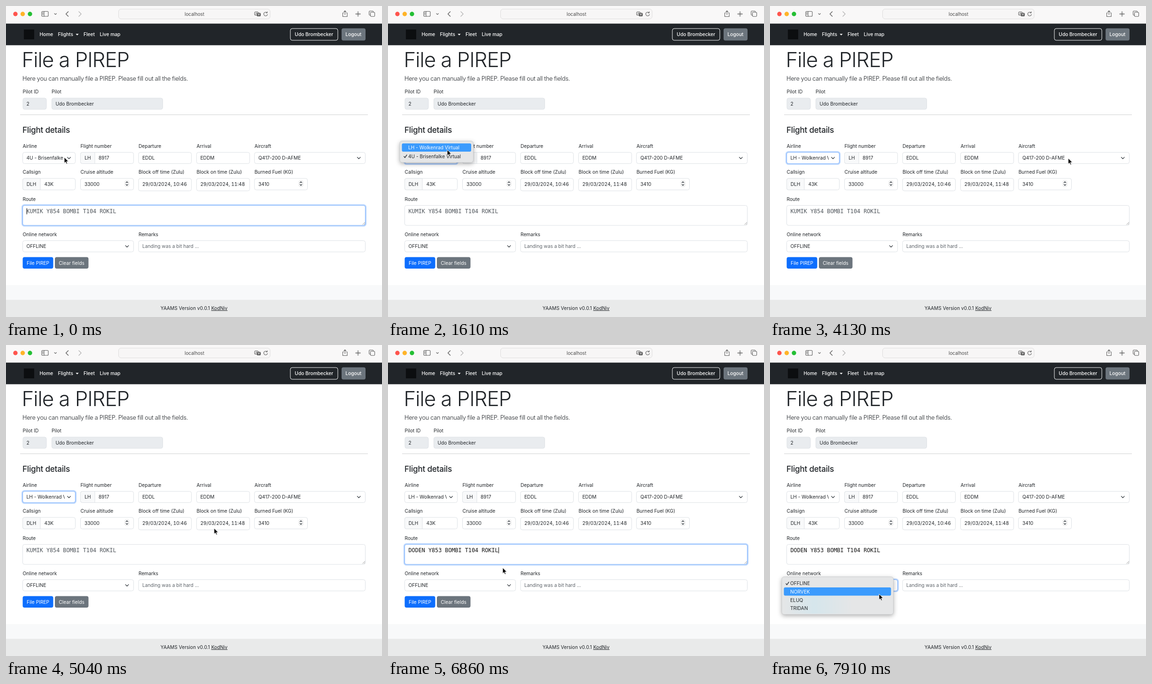
An HTML page that plays this animation: 800 px wide and 662 px high, repeating every 8 s.

```html
<!DOCTYPE html>
<html lang="en">
<head>
<meta charset="utf-8">
<title>File a PIREP</title>
<style>
  html, body { margin: 0; width: 100%; height: 100%; overflow: hidden; background: #fff; }
  svg { display: block; width: 800px; height: 662px; font: 10.2px Inter, "Liberation Sans", sans-serif; }
  text { fill: #212529; white-space: pre; }
  .mid { text-anchor: middle; }
  .white { fill: #fff; }
  .nav text { fill: #fff; font-weight: 500; }
  .title { font-size: 44px; font-weight: 300; letter-spacing: -.025em; }
  .lead { font-size: 12.8px; font-weight: 300; letter-spacing: -.023em; }
  .heading { font-size: 17.2px; font-weight: 500; letter-spacing: -.015em; }
  .address { font-size: 9.8px; fill: #4a4a4a; }
  .mono { font: 11.75px "DejaVu Sans Mono", monospace; }
  .hint { fill: #5f656b; }
  .mono.hint { fill: #50565c; }
  .date { font-variant-numeric: tabular-nums; }
  .box rect { fill: #fff; stroke: #dee2e6; rx: 4px; }
  .box .off { fill: #e9ecef; }
  .addon { fill: #f8f9fa; stroke: #dee2e6; }
  .line { fill: none; stroke: #343a40; stroke-width: 1.3; stroke-linecap: round; stroke-linejoin: round; }
  .icons { fill: none; stroke: #606060; stroke-width: 1.1; stroke-linecap: round; stroke-linejoin: round; }
  .ring { fill: none; stroke: #bfd9fe; stroke-width: 2.6; }
  .edge { fill: none; stroke: #86b7fe; stroke-width: 1.2; }
  .menu { filter: drop-shadow(0 3px 5px rgba(0, 0, 0, .3)); }
  .panel { fill: #e5e6e7; stroke: #c6c8ca; stroke-width: .8; }
  .pick { fill: #3b9bfd; }
  .caret { stroke: #111; stroke-width: 1.1; }

  .state { opacity: 0; animation: 8s step-end infinite; }
  .old-airline { animation-name: old-airline; }
  .new-airline { animation-name: new-airline; }
  .airline-focus { animation-name: airline-focus; }
  .airline-menu { animation-name: airline-menu; }
  .airline-first { animation-name: airline-first; }
  .airline-second { animation-name: airline-second; }
  .old-route { animation-name: old-route; }
  .new-route { animation-name: new-route; }
  .route-focus { animation-name: route-focus; }
  .caret-start { animation-name: caret-start; }
  .caret-end { animation-name: caret-end; }
  .network { animation-name: network; }
  .network-first { animation-name: network-first; }
  .network-second { animation-name: network-second; }
  .arrow { animation-name: arrow; }
  .beam { animation-name: beam; }

  @keyframes old-airline { 0% { opacity: 1 } 22.4% { opacity: 0 } }
  @keyframes new-airline { 22.4% { opacity: 1 } 100% { opacity: 1 } }
  @keyframes airline-focus { 7% { opacity: 1 } 75.6% { opacity: 0 } }
  @keyframes airline-menu { 7% { opacity: 1 } 22.4% { opacity: 0 } }
  @keyframes airline-second { 7% { opacity: 1 } 15.8% { opacity: 0 } }
  @keyframes airline-first { 15.8% { opacity: 1 } 22.4% { opacity: 0 } }
  @keyframes old-route { 0% { opacity: 1 } 79.4% { opacity: 0 } }
  @keyframes new-route { 79.4% { opacity: 1 } 100% { opacity: 1 } }
  @keyframes route-focus { 0%, 75.6% { opacity: 1 } 7%, 90.1% { opacity: 0 } }
  @keyframes caret-start { 0%, 75.6% { opacity: 1 } 7%, 79.4% { opacity: 0 } }
  @keyframes caret-end { 79.4% { opacity: 1 } 90.1% { opacity: 0 } }
  @keyframes network { 90.1% { opacity: 1 } 100% { opacity: 1 } }
  @keyframes network-first { 90.1% { opacity: 1 } 94.3% { opacity: 0 } }
  @keyframes network-second { 94.3% { opacity: 1 } 100% { opacity: 1 } }
  @keyframes arrow { 0%, 45.6%, 84.5% { opacity: 1 } 27.5%, 68.5% { opacity: 0 } 100% { opacity: 1 } }
  @keyframes beam { 27.5%, 68.5% { opacity: 1 } 45.6%, 84.5% { opacity: 0 } }

  .pointer { animation: pointer 8s ease-in-out infinite; }
  @keyframes pointer {
    0%, 12.5% { transform: translate(124px, 322px) }
    18.7%, 22% { transform: translate(126px, 306px) }
    29.2%, 38.2% { transform: translate(200px, 318px) }
    49.8%, 52% { transform: translate(634.5px, 324px); animation-timing-function: ease-in }
    61% { transform: translate(500px, 372px); animation-timing-function: ease-out }
    72%, 80.6% { transform: translate(298px, 435px) }
    85.7% { transform: translate(244px, 474px) }
    88.8%, 92.5% { transform: translate(233px, 512px) }
    96.3%, 100% { transform: translate(232px, 530px) }
  }
</style>
</head>
<body>
<svg viewBox="0 0 800 662">
  <defs>
    <path id="chevron" class="line" d="M-3.3 -1.6 0 1.7 3.3 -1.6"/>
    <path id="tick" class="line" d="M-3 .3 -1 2.7 3 -3" style="stroke-width:1.5"/>
    <g id="spinner">
      <rect x="-4.5" y="-6.5" width="9" height="13" rx="4" fill="#fff" stroke="#d5d5d5" stroke-width=".8"/>
      <path class="line" d="M-2 -1.8 0 -4 2 -1.8M-2 1.8 0 4 2 1.8"/>
    </g>
    <linearGradient id="tint">
      <stop stop-color="#cfe6ee" stop-opacity="0"/>
      <stop offset=".45" stop-color="#cfe6ee" stop-opacity=".7"/>
      <stop offset="1" stop-color="#cfe6ee" stop-opacity="0"/>
    </linearGradient>
    <clipPath id="airline-clip"><rect x="40" y="312" width="84.5" height="24"/></clipPath>
  </defs>

  <!-- browser bar -->
  <rect width="800" height="38" fill="#f9f8f8"/>
  <circle cx="20" cy="17" r="4.7" fill="#ff544d"/>
  <circle cx="35.5" cy="17" r="4.7" fill="#ffb429"/>
  <circle cx="51" cy="17" r="4.7" fill="#24bf34"/>
  <rect x="239.5" y="6.5" width="322.5" height="21" rx="5.5" fill="#f7f6f6" stroke="#dfdede"/>
  <text class="mid address" x="401" y="20.7">localhost</text>
  <g class="icons">
    <rect x="76" y="11.5" width="14" height="10.5" rx="2"/>
    <path d="M81 11.5V22M77.8 14H79.2M77.8 16H79.2M77.8 18H79.2"/>
    <path d="M103 16 105.2 18.2 107.4 16"/>
    <path d="M132.5 12 127.5 17 132.5 22" stroke-width="1.4"/>
    <path d="M155 12 160 17 155 22" stroke="#b5b5b5" stroke-width="1.4"/>
    <path d="M718.5 14.8H716.5V22.5H726V14.8H724M721.2 18.5V10.3M718.8 12.5 721.2 10.2 723.6 12.5"/>
    <path d="M744 17H754M749 12V22" stroke-width="1.3"/>
    <path d="M775 19.5H774Q772.6 19.5 772.6 18V12.2Q772.6 10.7 774 10.7H780Q781.5 10.7 781.5 12.2V13"/>
    <rect x="775.5" y="13.3" width="9" height="9" rx="1.5"/>
    <path d="M555.5 14.5A4 4 0 1 0 556.3 18M555.8 12V14.8H553"/>
    <rect x="529" y="12.5" width="7.5" height="7" rx="2"/>
    <path d="M531 17.5 532.7 14 534.4 17.5" stroke-width=".8"/>
    <rect x="534" y="15" width="7.5" height="6.5" rx="2" fill="#606060"/>
    <path d="M536 17H539.8M537 19.8 539 17.4M536.8 17.6 539 19.8" stroke="#fff" stroke-width=".7"/>
  </g>

  <!-- navigation -->
  <rect y="37.5" width="800" height="46" fill="#212529"/>
  <rect x="38" y="50" width="22" height="21" fill="#0c0e10"/>
  <g class="nav">
    <text x="71.5" y="64">Home</text>
    <text x="110.5" y="64">Flights</text>
    <path d="M148.3 59.2H154.7L151.5 62.4Z" fill="#fff"/>
    <text x="165" y="64">Fleet</text>
    <text x="199.5" y="64">Live map</text>
    <rect x="605" y="48" width="101" height="25" rx="4" fill="none" stroke="#f8f9fa"/>
    <text class="mid" x="655.3" y="64">Udo Brombecker</text>
    <rect x="714" y="47.5" width="51" height="26" rx="4" fill="#6c757d"/>
    <text class="mid" x="739.3" y="64">Logout</text>
  </g>

  <!-- form -->
  <text class="title" x="33.5" y="129.5">File a PIREP</text>
  <text class="lead" x="35" y="159.3">Here you can manually file a PIREP. Please fill out all the fields.</text>
  <text x="35.5" y="186.2">Pilot ID</text>
  <text x="97" y="186.2">Pilot</text>
  <path d="M30 231.5H770" stroke="#d0d1d2"/>
  <text class="heading" x="35" y="270">Flight details</text>

  <g class="box">
    <rect class="off" x="36" y="196" width="50" height="24"/>
    <rect class="off" x="97.5" y="196" width="236" height="24"/>
    <rect x="35.5" y="311.5" width="112" height="24"/>
    <rect x="158.5" y="311.5" width="113" height="24"/>
    <rect x="282" y="311.5" width="112.5" height="24"/>
    <rect x="405.5" y="311.5" width="113" height="24"/>
    <rect x="528.7" y="311.5" width="235.8" height="24"/>
    <rect x="35.5" y="367" width="112" height="24.5"/>
    <rect x="158.5" y="367" width="113" height="24.5"/>
    <rect x="282" y="367" width="112.5" height="26.5"/>
    <rect x="405.5" y="367" width="113" height="26.5"/>
    <rect x="528.7" y="367" width="112.8" height="24.5"/>
    <rect x="35.5" y="424.5" width="729" height="42.5"/>
    <rect x="35.5" y="499.5" width="236" height="24"/>
    <rect x="282" y="499.5" width="482.5" height="24"/>
  </g>
  <path class="addon" d="M189 311.5H162.5Q158.5 311.5 158.5 315.5V331.5Q158.5 335.5 162.5 335.5H189Z"/>
  <path class="addon" d="M73 367H39.5Q35.5 367 35.5 371V387.5Q35.5 391.5 39.5 391.5H73Z"/>

  <text x="43.5" y="212">2</text>
  <text x="105.5" y="212">Udo Brombecker</text>

  <text x="35.5" y="302">Airline</text>
  <text x="158.5" y="302">Flight number</text>
  <text x="282" y="302">Departure</text>
  <text x="405.5" y="302">Arrival</text>
  <text x="528.7" y="302">Aircraft</text>
  <g clip-path="url(#airline-clip)">
    <text class="state old-airline" x="43.5" y="327.2">4U - Brisenfalke Virtual</text>
    <text class="state new-airline" x="43.5" y="327.2">LH - Wolkenrad Virtual</text>
  </g>
  <text class="mid" x="174" y="327.2">LH</text>
  <text x="197" y="327.2">8917</text>
  <text x="290" y="327.2">EDDL</text>
  <text x="413.5" y="327.2">EDDM</text>
  <text x="537" y="327.2">Q417-200 D-AFME</text>

  <text x="35.5" y="357.3">Callsign</text>
  <text x="158.5" y="357.3">Cruise altitude</text>
  <text x="282" y="357.3">Block off time (Zulu)</text>
  <text x="405.5" y="357.3">Block on time (Zulu)</text>
  <text x="528.7" y="357.3">Burned Fuel (KG)</text>
  <text class="mid" x="54" y="382.8">DLH</text>
  <text x="81.5" y="382.8">43K</text>
  <text x="167" y="382.8">33000</text>
  <text class="date" x="290" y="383.4">29/03/2024, 10:46</text>
  <text class="date" x="413.5" y="383.4">29/03/2024, 11:48</text>
  <text x="537" y="382.8">3410</text>

  <text x="35.5" y="415.2">Route</text>
  <text x="35.5" y="489.7">Online network</text>
  <text x="282" y="489.7">Remarks</text>
  <text x="43.5" y="515.2">OFFLINE</text>
  <text class="hint" x="290" y="515.2">Landing was a bit hard ...</text>

  <use href="#chevron" x="134" y="323.5"/>
  <use href="#chevron" x="750.7" y="323.5"/>
  <use href="#chevron" x="257.5" y="511.5"/>
  <use href="#spinner" x="257.3" y="378"/>
  <use href="#spinner" x="627.5" y="378"/>

  <g class="state airline-focus">
    <rect class="ring" x="34.2" y="310.2" width="114.6" height="26.6" rx="5"/>
    <rect class="edge" x="35.5" y="311.5" width="112" height="24" rx="4"/>
  </g>
  <g class="state route-focus">
    <rect class="ring" x="34.2" y="423.2" width="731.6" height="45.1" rx="5"/>
    <rect class="edge" x="35.5" y="424.5" width="729" height="42.5" rx="4"/>
  </g>
  <path d="M758.5 465.5 764 460M761.5 465.5 764 463" stroke="#8a8a8a" stroke-width=".8"/>
  <text class="mono hint state old-route" x="43.5" y="441">KUMIK Y854 BOMBI T104 ROKIL</text>
  <text class="mono state new-route" x="43.5" y="441" style="fill:#111">DODEN Y853 BOMBI T104 ROKIL</text>
  <path class="caret state caret-start" d="M44.3 430.5V443.5"/>
  <path class="caret state caret-end" d="M235.5 430.5V443.5"/>

  <rect x="35.5" y="534.5" width="65" height="24.5" rx="4" fill="#0d6efd"/>
  <text class="mid white" x="68" y="550.6">File PIREP</text>
  <rect x="104" y="534.5" width="71.5" height="24.5" rx="4" fill="#6c757d"/>
  <text class="mid white" x="139.6" y="550.6">Clear fields</text>

  <!-- footer -->
  <rect y="594" width="800" height="32" fill="#f8f9fa"/>
  <rect y="625.5" width="800" height="36.5" fill="#e9eaea"/>
  <text class="mid" x="400" y="646.8">YAAMS Version v0.0.1 <tspan text-decoration="underline">KodNiv</tspan></text>

  <!-- airline list -->
  <g class="state airline-menu">
    <g class="menu"><rect class="panel" x="25" y="287.5" width="156.5" height="45.5" rx="5"/></g>
    <text x="43" y="305.3">LH - Wolkenrad Virtual</text>
    <text x="43" y="323.6">4U - Brisenfalke Virtual</text>
    <use href="#tick" x="37" y="320"/>
    <g class="state airline-first">
      <rect class="pick" x="29.5" y="292.5" width="147.5" height="17.5" rx="3"/>
      <text class="white" x="43" y="305.3">LH - Wolkenrad Virtual</text>
    </g>
    <g class="state airline-second">
      <rect class="pick" x="29.5" y="311" width="147.5" height="17.5" rx="3"/>
      <text class="white" x="43" y="323.6">4U - Brisenfalke Virtual</text>
      <use href="#tick" x="37" y="320" style="filter:invert(1)"/>
    </g>
  </g>

  <!-- network list -->
  <g class="state network">
    <rect class="ring" x="34.2" y="498.2" width="238.6" height="26.6" rx="5"/>
    <rect class="edge" x="35.5" y="499.5" width="236" height="24" rx="4"/>
    <g class="menu"><rect class="panel" x="25" y="493.5" width="237.5" height="80" rx="5"/></g>
    <rect x="26" y="534" width="150" height="38" fill="url(#tint)"/>
    <text x="43" y="511.2">OFFLINE</text>
    <text x="43" y="528.8">NORVEK</text>
    <text x="43" y="546.5">ELUQ</text>
    <text x="43" y="564.2">TRIDAN</text>
    <use href="#tick" x="37" y="507.7"/>
    <g class="state network-first">
      <rect class="pick" x="29.5" y="498.5" width="228" height="17.5" rx="3"/>
      <text class="white" x="43" y="511.2">OFFLINE</text>
      <use href="#tick" x="37" y="507.7" style="filter:invert(1)"/>
    </g>
    <g class="state network-second">
      <rect class="pick" x="29.5" y="516" width="228" height="17.5" rx="3"/>
      <text class="white" x="43" y="528.8">NORVEK</text>
    </g>
  </g>

  <g class="pointer">
    <path class="state arrow" d="M0 0V12.4L2.8 9.8 4.7 14.2 6.7 13.3 4.8 9H8.7Z" fill="#000" stroke="#fff" stroke-width=".9"/>
    <g class="state beam" fill="none" stroke-linecap="round">
      <path d="M-2.8 -6.5Q0 -6.5 0 -4.5 0 -6.5 2.8 -6.5M0 -4.5V4.5M-2.8 6.5Q0 6.5 0 4.5 0 6.5 2.8 6.5M-1.5 2H1.5" stroke="#fff" stroke-width="2.4"/>
      <path d="M-2.8 -6.5Q0 -6.5 0 -4.5 0 -6.5 2.8 -6.5M0 -4.5V4.5M-2.8 6.5Q0 6.5 0 4.5 0 6.5 2.8 6.5M-1.5 2H1.5" stroke="#111" stroke-width="1.1"/>
    </g>
  </g>
</svg>
</body>
</html>
```
